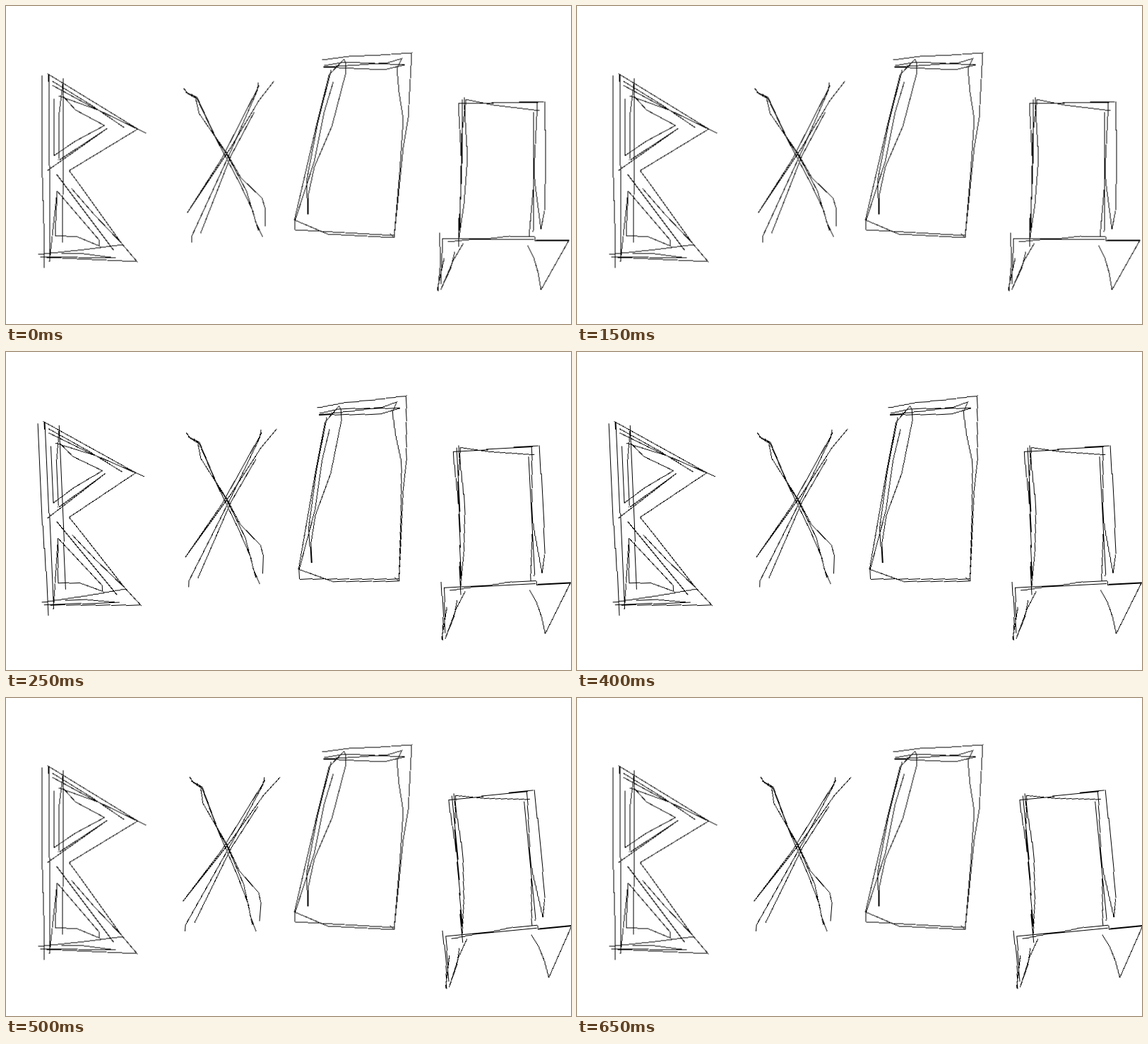
Recreate the animation shown at these times as an HTML page. Size 800x451 px, loop 0.75 s.

```html
<!DOCTYPE html>
<html lang="ru">
<head>
<meta charset="utf-8">
<title>Sketched letters</title>
<style>
  html, body { margin: 0; width: 100%; height: 100%; overflow: hidden; background: #fff; }
  svg { display: block; width: 800px; height: 451px; }
  path {
    fill: none; stroke: #000; stroke-width: 1; shape-rendering: crispEdges;
    transform-box: view-box;
    animation: sway 750ms step-end infinite;
  }
  /* --a and --b are the second and third poses */
  .ve { transform-origin: 112px 235px; --a: -2.5deg; --b: 0deg; }
  .ha { transform-origin: 314px 216px; --a: 2.1deg; --b: 4.7deg; }
  .o  { transform-origin: 493px 202px; --a: -3.2deg; --b: 0deg; }
  .de { transform-origin: 701px 285px; --a: -3deg; --b: -5.6deg; }
  @keyframes sway {
    0% { transform: rotate(0deg); }
    33.33% { transform: rotate(var(--a)); }
    66.66%, 100% { transform: rotate(var(--b)); }
  }
</style>
</head>
<body>
<svg viewBox="-.5 -.5 800 451">
  <path class="ve" d="M50 98V210L54 340 53 372
    M61 118L59 96 186 174 89 233 103 252 163 336 185 362 57 356
    M60 97V212L62 240 61 362
    M65 106L120 140 167 172 M65 112L122 143 198 180 M74 127L130 147 186 174
    M67 131V212L98 191 139 169 98 147 80 127
    M80 102L81 200 79 337 M81 102L75 150 74 218
    M75 218L143 173 58 233
    M71 238L152 346 M92 258L125 296 165 338 110 345 45 352
    M77 350L110 351 155 357 47 355
    M61 362L72 262 69 325 101 327 132 340 131 331 72 262"/>
  <path class="ha" d="M251 116L257 124 268 130 273 152 291 178 315 215 340 262 357 318
    M254 122L270 129 296 185 312 208 332 243 362 272 366 285V312
    M262 124L270 131 297 188 330 250 349 290 353 306 363 327
    M379 106L358 133 318 200 256 293
    M357 108L355 120 318 205 263 325 262 335
    M351 150L318 212 275 322
    M358 112L305 216 256 293"/>
  <path class="o" d="M447 76L485 71 530 69 574 66 569 158 562 200 549 328
    M449 86L500 83 540 80 560 74 553 88 556 122 562 160 557 235 549 328 543 322
    M450 84L480 79 564 83 535 90 449 86
    M549 328L455 323 408 303 409 317 462 320 549 325
    M408 303L440 165 457 97 478 75 481 81 480 97 461 170 436 228 427 270V295L425 248 441 165 460 90
    M463 107L450 150 436 220 409 303"/>
  <path class="de" d="M640 137L690 137 762 135 764 215 762 290 757 316 749 255 747 235 752 137 686 136
    M650 132L690 140 755 148
    M645 130L646 200 640 341
    M648 129L650 165 653 215 648 280 640 335
    M640 137L645 230 640 341 641 300
    M651 132L645 180 642 320
    M746 152V260L740 327 M747 150L746 320
    M618 329L686 329 712 326 748 327V332L797 333
    M625 334L655 331 748 330 M750 331H797L757 402 753 378 747 357 738 339
    M613 321L615 360 611 404 M618 329L615 394 M620 357L610 403
    M647 336L633 360 615 402 M635 348L629 372 615 402"/>
</svg>
</body>
</html>
```
